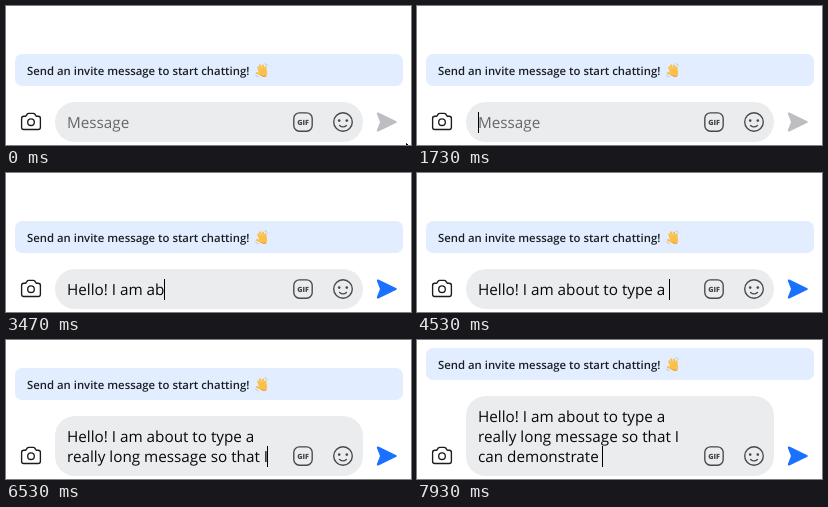
An HTML page that plays this animation: 405x139 px, repeating every 8000 ms.

```html
<!DOCTYPE html>
<html lang="en">
<head>
<meta charset="utf-8">
<title>Message box</title>
<style>
  html, body { margin: 0; width: 100%; height: 100%; overflow: hidden; background: #fff; }
  svg { display: block; width: 405px; height: 139px; }
  text { font-family: "Open Sans", "Noto Sans", sans-serif; white-space: pre; text-rendering: geometricPrecision; }
  .entry { font-size: 15.25px; fill: #080809; }
  #hint { fill: #65676b; }
  .notice { font-size: 11.35px; font-weight: 600; fill: #1c1e22; }
  .line { fill: none; stroke: #1c1c1e; stroke-width: 1.35; stroke-linecap: round; stroke-linejoin: round; }
  .soft { stroke: #46484c; }
</style>
</head>
<body>
<svg viewBox="0 0 405 139">
  <g id="banner">
    <rect x="9" y="48" width="388" height="32" rx="7" fill="#e2eeff"/>
    <text class="notice" x="21" y="69">Send an invite message to start chatting!</text>
    <g fill="none" stroke-linecap="round">
      <path d="M254 66 L252.2 61.4 M255.6 64 L254 59.4 M257.6 63.6 L257 59.6 M259.4 64.6 L259.6 61.2 M254.6 68.4 L250.8 67" stroke="#fcc04a" stroke-width="2.1"/>
      <path d="M253.6 65 Q257 62 260.4 64.6 Q261.6 69.4 259 70.4 Q255.4 70.8 253.6 65Z" fill="#fcc04a" stroke="#fcc04a"/>
      <path d="M254.8 69.4 Q257 71.2 260 70.2" stroke="#ee9a2e"/>
      <path d="M249.6 69 Q250.4 70.4 252 70.8 M259 57.8 Q260.6 58 261.4 59.4" stroke="#a9b9cf" stroke-width=".8"/>
    </g>
  </g>

  <rect id="box" x="49" width="308" rx="20" fill="#ebeced"/>

  <g class="line">
    <path d="M17.8 110.2 H19.8 L21.3 108 Q21.8 107.4 22.6 107.4 H27.4 Q28.2 107.4 28.7 108 L30.2 110.2 H32.2 Q34.4 110.2 34.4 112.4 V121.3 Q34.4 123.5 32.2 123.5 H17.8 Q15.6 123.5 15.6 121.3 V112.4 Q15.6 110.2 17.8 110.2Z"/>
    <circle cx="25" cy="116.2" r="3.3"/>
  </g>

  <rect class="line soft" x="287.8" y="106.8" width="18.4" height="18.4" rx="5.6"/>
  <text x="297" y="118.6" text-anchor="middle" font-size="7.2" font-weight="800" fill="#46484c">GIF</text>

  <circle class="line soft" cx="337" cy="116" r="9.3"/>
  <path class="line soft" d="M333.6 119.4 Q337 122.4 340.4 119.4"/>
  <g fill="#46484c"><circle cx="333.2" cy="114.6" r="1.3"/><circle cx="340.8" cy="114.6" r="1.3"/></g>

  <path id="send" d="M372.4 106.6 L390.4 115.3 Q391.4 116 390.4 116.7 L372.4 125.4 Q370.4 126 370.9 124 L374 116 L370.9 108 Q370.4 106 372.4 106.6Z"/>

  <text class="entry" id="hint" x="61" y="122">Message</text>
  <text class="entry row" x="61"></text>
  <text class="entry row" x="61"></text>
  <text class="entry row" x="61"></text>
  <rect id="caret" y="106" width="1" height="21" fill="#000"/>

  <path id="arrow" d="M.5 .5 V15.5 L4 12.2 L6.4 17.8 L8.8 16.8 L6.4 11.3 H11.2Z" fill="#fff" stroke="#000"/>
  <path id="beam" d="M1 .5 H3 Q4 .5 4 1.5 Q4 .5 5 .5 H7 M4 1.5 V15.5 M1 16.5 H3 Q4 16.5 4 15.5 Q4 16.5 5 16.5 H7" fill="none" stroke="#000"/>
</svg>
<script>
const LOOP = 8000, LEFT = 61, WRAP = 208, LINE = 20;

// [time, characters added]
const KEYS = [
  [1930, "H"], [2000, "e"], [2130, "l"],
  [2270, "l"], [2400, "o"], [2530, "!"],
  [2670, " "], [2730, "I"], [2870, " "],
  [3070, "a"], [3200, "m"], [3270, " "], [3400, "a"], [3470, "b"],
  [3600, "o"], [3670, "u"], [3730, "t"], [3800, " t"], [3870, "o"],
  [3930, " "], [4000, "t"],
  [4200, "yp"], [4270, "e"], [4400, " "], [4470, "a"], [4530, " "],
  [4600, "r"], [4670, "e"], [4730, "al"], [4800, "ly"], [4930, " l"],
  [5130, "o"], [5200, "n"], [5330, "g"], [5400, " "], [5530, "me"], [5600, "s"], [5730, "sa"],
  [5870, "g"], [5930, "e"], [6000, " "], [6070, "s"], [6130, "o"],
  [6200, " t"], [6270, "h"], [6400, "a"], [6470, "t "], [6530, "I"],
  [6670, " "], [6730, "c"], [6800, "an"], [6930, " "], [7000, "de"], [7070, "mo"],
  [7400, "n"], [7470, "s"], [7530, "t"], [7600, "ra"], [7730, "t"], [7800, "e"], [7930, " "]
];

// [time, shape, x, y]
const POINTER = [
  [0, "arrow", 400, 137], [270, "arrow", 352, 92], [330, "arrow", 274, 56],
  [400, "arrow", 205, 72], [470, "beam", 162, 101], [530, "beam", 142, 112],
  [870, "beam", 198, 105], [930, "", 0, 0]
];

const $ = id => document.getElementById(id);
const rows = [...document.querySelectorAll(".row")];
const pen = document.createElement("canvas").getContext("2d");
pen.font = '15.25px "Open Sans", "Noto Sans", sans-serif';
const widthOf = s => pen.measureText(s).width;
const show = (el, on) => el.setAttribute("visibility", on ? "visible" : "hidden");

function wrap(text) {
  const lines = [""];
  for (const word of text.match(/\S+\s*/g) || []) {
    const last = lines.length - 1;
    if (widthOf((lines[last] + word).trimEnd()) > WRAP) lines.push(word);
    else lines[last] += word;
  }
  return lines;
}

function draw(t) {
  const text = KEYS.filter(k => k[0] <= t).map(k => k[1]).join("");
  const lines = wrap(text);
  const extra = (lines.length - 1) * LINE;

  $("banner").setAttribute("transform", `translate(0 ${-extra})`);
  $("box").setAttribute("y", 96 - extra);
  $("box").setAttribute("height", 40 + extra);
  rows.forEach((row, i) => {
    row.textContent = lines[i] || "";
    row.setAttribute("y", 122 - extra + i * LINE);
  });
  show($("hint"), !text);
  $("send").setAttribute("fill", text ? "#1a70ff" : "#bcbec1");

  $("caret").setAttribute("x", Math.floor(LEFT + widthOf(lines[lines.length - 1])));
  show($("caret"), (t >= 730 && t < 1200) || t >= 1730);

  const [, shape, x, y] = POINTER.filter(p => p[0] <= t).pop();
  for (const id of ["arrow", "beam"]) {
    show($(id), id === shape);
    $(id).setAttribute("transform", `translate(${x} ${y})`);
  }
}

const start = performance.now();
function tick() {
  draw((performance.now() - start) % LOOP);
  requestAnimationFrame(tick);
}
tick();
</script>
</body>
</html>
```
